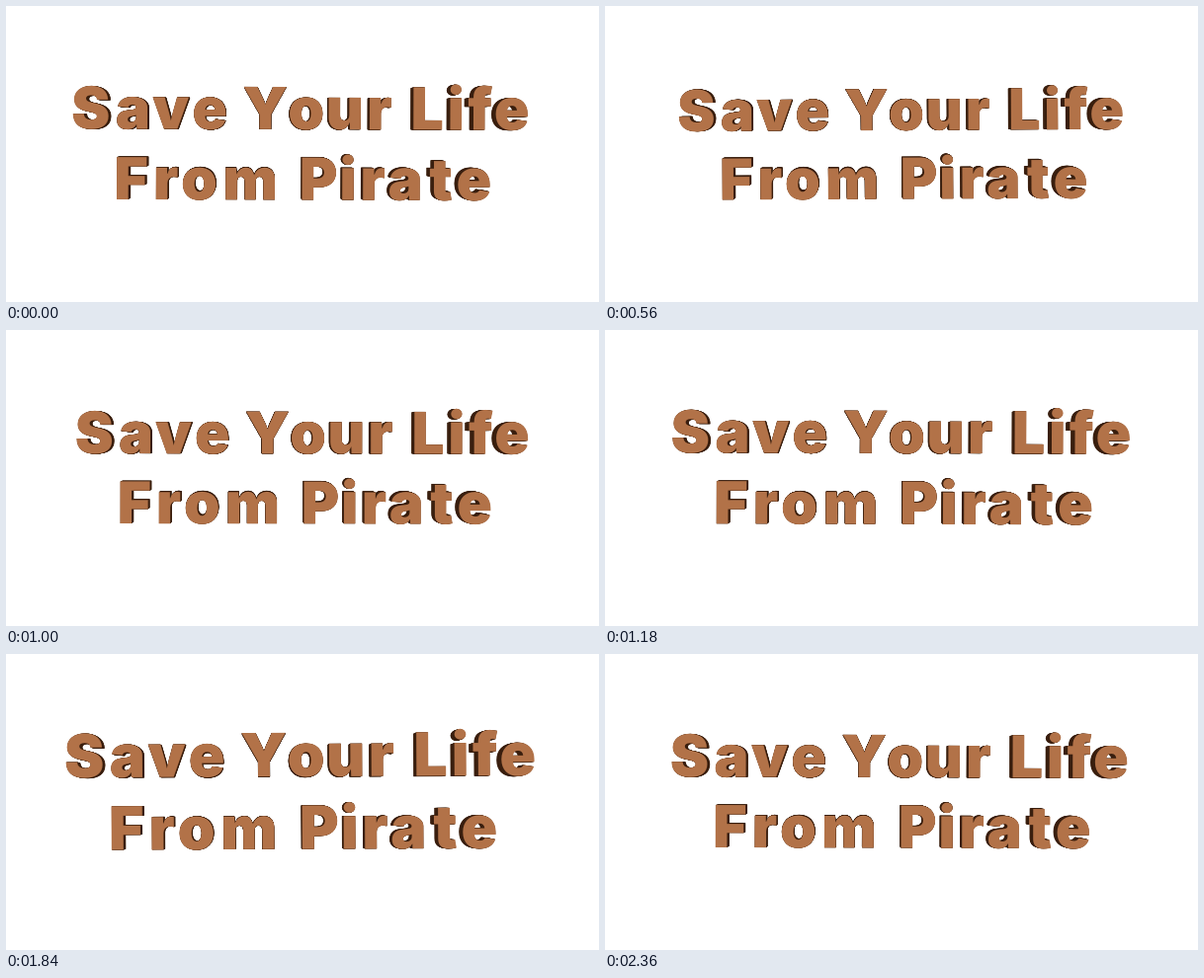
An HTML page that plays this animation: 600x300 px, repeating every 2.38 s.

```html
<!DOCTYPE html>
<html lang="en">
<head>
<meta charset="utf-8">
<style>
  html, body { margin: 0; width: 100%; height: 100%; overflow: hidden; background: #fff; }
  svg { display: block; }
  text { font: 900 59px Inter, sans-serif; text-anchor: middle; }
</style>
</head>
<body>
<svg width="600" height="300" viewBox="0 0 600 300">
  <defs>
    <g id="words">
      <text y="125" x="86.5 129 167.5 207 225 263 304.5 343.5 378.5 400 427 456 480.5 512.5">Save Your Life</text>
      <text y="196.5" x="127.5 162.5 196.5 248 285 317 347 372 405 441 474.5">From Pirate</text>
    </g>
  </defs>
  <g id="scene"></g>
</svg>
<script>
const LOOP = 2380, LAYERS = 12, DEPTH = 0.019;
const CENTER = { x: 300, y: 140 };
const scene = document.getElementById('scene');

// Layers run from the back of the extrusion to the front face.
const layers = Array.from({ length: LAYERS + 1 }, (_, i) => {
  const layer = document.createElementNS('http://www.w3.org/2000/svg', 'use');
  layer.setAttribute('href', '#words');
  layer.setAttribute('fill', i === LAYERS ? '#b27248' : '#3b2010');
  scene.append(layer);
  return layer;
});

function draw(now) {
  const angle = (now % LOOP) / LOOP * 2 * Math.PI;
  const sin = Math.sin(angle), cos = Math.cos(angle);
  const zoom = 1.003 - 0.0275 * sin - 0.003 * cos;
  const x = CENTER.x + 0.8 * (sin - cos);
  const y = CENTER.y + 0.5 * sin;
  const tilt = 0.22 * Math.cos(2 * angle) - 0.05;
  layers.forEach((layer, i) => {
    const back = 1 - i / LAYERS;
    const scale = zoom * (1 - DEPTH * back);
    const lift = back * (0.3 + 0.6 * sin);
    layer.setAttribute('transform',
      `translate(${x - back} ${y - lift}) rotate(${tilt}) scale(${scale}) translate(${-CENTER.x} ${-CENTER.y})`);
  });
  requestAnimationFrame(draw);
}
requestAnimationFrame(draw);
</script>
</body>
</html>
```
